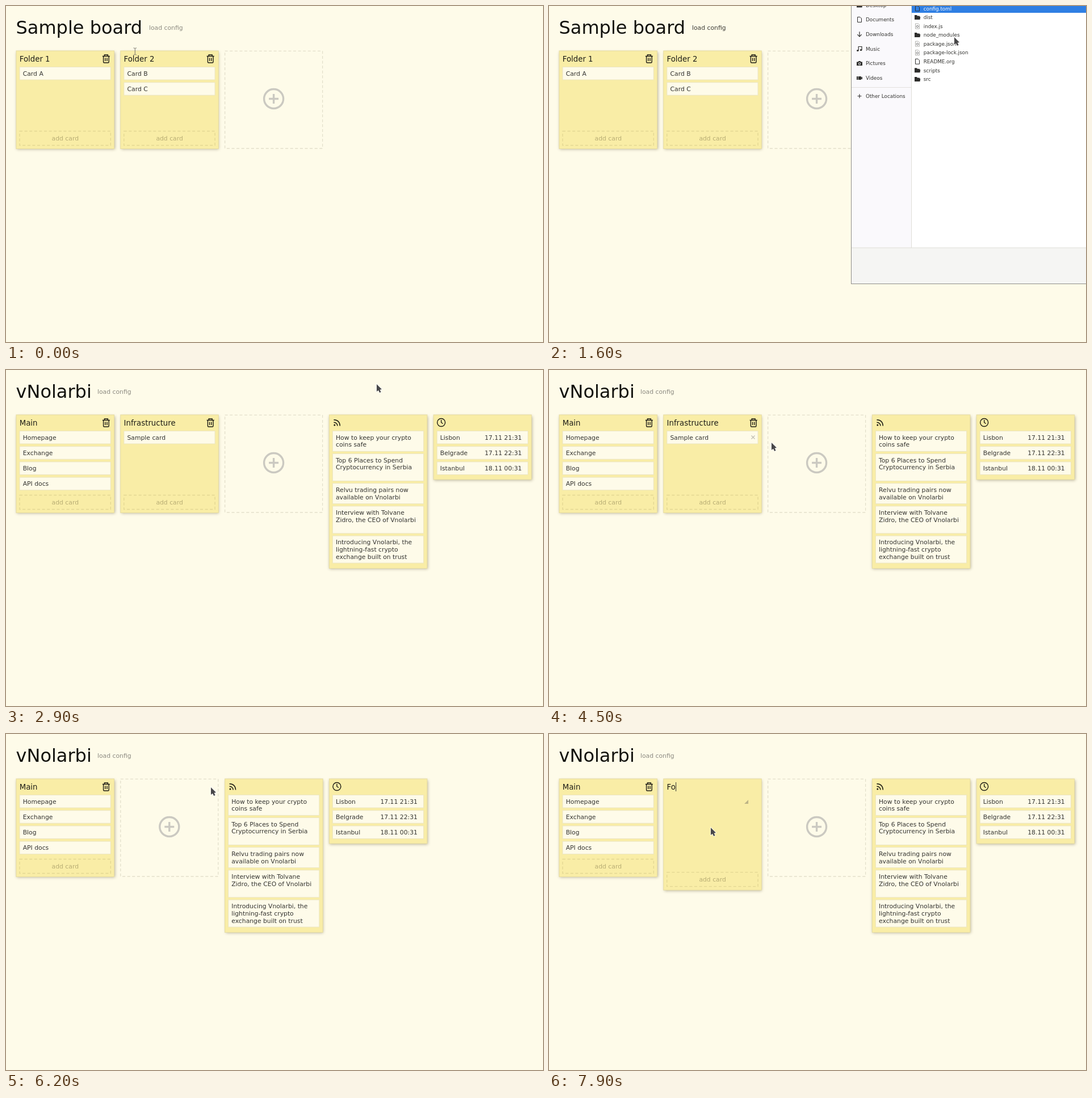
An HTML page with a canvas that plays this animation: 946x592 px, repeating every 8000 ms.

```html
<!DOCTYPE html>
<html lang="en">
<head>
<meta charset="utf-8">
<title>Board</title>
<style>
html, body { margin: 0; width: 100%; height: 100%; overflow: hidden; background: #fefbe9; }
canvas { display: block; }
</style>
</head>
<body>
<canvas id="stage" width="946" height="592"></canvas>
<script>
const ctx = document.getElementById('stage').getContext('2d');
const LOOP = 8000, STEP = 100, PAPER = '#fefbe9', YELLOW = '#f9eda6', INK = '#333330';
const DIALOG_OPEN = 1100, LOADED = 2800, CARD_GONE = 5200, FOLDER_GONE = 6200, FOLDER_NEW = 7000;

// time, x, y of the pointer tip
const PATH = [
  [0, 227, 80], [300, 200, 205], [400, 200, 205], [800, 282, 38], [1000, 282, 38],
  [1600, 714, 55], [1800, 690, 12], [2600, 653, 6], [2700, 653, 6], [2900, 653, 25],
  [3600, 720, 150], [3700, 720, 150], [4200, 520, 215], [4400, 345, 122], [4500, 392, 128],
  [5000, 361, 117], [5400, 361, 117], [6000, 361, 94], [6200, 361, 94], [6800, 285, 165], [8000, 285, 165]
];
const FEED = [
  [36, 'How to keep your crypto', 'coins safe'],
  [48, 'Top 6 Places to Spend', 'Cryptocurrency in Serbia'],
  [36, 'Relvu trading pairs now', 'available on Vnolarbi'],
  [48, 'Interview with Tolvane', 'Zidro, the CEO of Vnolarbi'],
  [48, 'Introducing Vnolarbi, the', 'lightning-fast crypto', 'exchange built on trust']
];
const ZONES = [['Lisbon', '17.11 21:31'], ['Belgrade', '17.11 22:31'], ['Istanbul', '18.11 00:31']];
const FILES = [
  ['config.toml', 'doc'], ['dist', 'folder'], ['index.js', 'script'], ['node_modules', 'folder'],
  ['package.json', 'script'], ['package-lock.json', 'script'], ['README.org', 'doc'],
  ['scripts', 'folder'], ['src', 'folder']
];
const PLACES = [
  ['Desktop', 'folder', -1.5], ['Documents', 'doc', 24], ['Downloads', 'down', 49.7], ['Music', 'note', 75.5],
  ['Pictures', 'camera', 101], ['Videos', 'video', 127], ['Other Locations', 'plus', 158.7]
];

function pointerAt(t) {
  const i = Math.max(1, PATH.findIndex(p => p[0] >= t));
  const [a, b] = [PATH[i - 1], PATH[i]];
  const k = Math.max(0, (t - a[0]) / (b[0] - a[0]));
  return { x: a[1] + (b[1] - a[1]) * k, y: a[2] + (b[2] - a[2]) * k };
}

const inside = (p, x, y, w, h) => p.x >= x && p.x <= x + w && p.y >= y && p.y <= y + h;

function text(str, x, y, size = 10.8, color = INK, align = 'left') {
  ctx.font = `${size}px "DejaVu Sans", sans-serif`;
  ctx.fillStyle = color;
  ctx.textAlign = align;
  ctx.fillText(str, x, y);
}

function rect(x, y, w, h, fill) {
  ctx.fillStyle = fill;
  ctx.fillRect(x, y, w, h);
}

function stroke(d, color, width, x = 0, y = 0) {
  ctx.save();
  ctx.translate(x, y);
  ctx.strokeStyle = color;
  ctx.lineWidth = width;
  ctx.stroke(new Path2D(d));
  ctx.restore();
}

function fill(d, color, x = 0, y = 0) {
  ctx.save();
  ctx.translate(x, y);
  ctx.fillStyle = color;
  ctx.fill(new Path2D(d));
  ctx.restore();
}

function dashed(x, y, w, h, color) {
  ctx.setLineDash([5, 3.6]);
  ctx.strokeStyle = color;
  ctx.lineWidth = 1.3;
  ctx.strokeRect(x, y, w, h);
  ctx.setLineDash([]);
}

function panel(x, h) {
  ctx.save();
  ctx.shadowColor = 'rgba(60,50,10,.35)';
  ctx.shadowBlur = 5;
  ctx.shadowOffsetX = 1;
  ctx.shadowOffsetY = 1.5;
  rect(x, 79, 172.5, h, YELLOW);
  ctx.restore();
  ctx.strokeStyle = '#e6dca2';
  ctx.lineWidth = 1;
  ctx.strokeRect(x, 79, 172.5, h);
}

function card(x, y, h) {
  rect(x + 6, y, 160.3, h, PAPER);
  ctx.strokeStyle = '#ece5c0';
  ctx.lineWidth = 1;
  ctx.strokeRect(x + 6, y, 160.3, h);
}

function trash(x) {
  stroke('M-6.5-4.5H6.5M-3-4.5V-7H3V-4.5M-4.8-4.5V5.5Q-4.8 7-3.3 7H3.3Q4.8 7 4.8 5.5V-4.5M-1.6-1.5V4M1.6-1.5V4',
    '#1c1b14', 1.4, x + 158.4, 93);
}

function folder({ name, cards = [], addY = 220.5, height = 172.5, editing }, x, mouse) {
  panel(x, height);
  text(name, x + 5.7, 97.5, 13.333, '#1f1e18');
  if (editing) {
    rect(x + 6 + ctx.measureText(name).width, 85, 1, 16, '#333');
    fill('M0 0V7H-7Z', '#bdb486', x + 149.3, 116);
  } else trash(x);
  cards.forEach((label, i) => {
    const y = 107.5 + 27.2 * i;
    card(x, y, 22.5);
    text(label, x + 11.7, y + 15);
    if (inside(mouse, x + 6, y, 160, 22.5)) stroke('M-3-3L3 3M3-3L-3 3', '#bdbbb0', 1.1, x + 157.7, y + 11);
  });
  dashed(x + 6, addY, 160.3, 25, '#e2d692');
  text('add card', x + 86.3, addY + 16.3, 10.8, '#b8ad74', 'center');
}

function adder(x, mouse) {
  dashed(x, 79.3, 172, 171.7, '#e3dfcb');
  const near = Math.hypot(mouse.x - x - 86, mouse.y - 163.5) < 19;
  stroke('M-17 0A17 17 0 1 1 17 0A17 17 0 1 1-17 0M-8.5 0H8.5M0-8.5V8.5', near ? '#767469' : '#cbc9c1', 3.4, x + 86, 163.5);
}

function feed(x) {
  panel(x, 270.5);
  fill('M-5.6 4a1.5 1.5 0 1 0 3 0a1.5 1.5 0 1 0-3 0', '#1c1b14', x + 13.5, 93);
  stroke('M-5.5-.8Q.6-.5 1 5.5M-5.5-5.3Q5-5 5.5 5.5', '#1c1b14', 1.4, x + 13.5, 93);
  let y = 107.3;
  for (const [h, ...lines] of FEED) {
    card(x, y, h);
    lines.forEach((line, i) => text(line, x + 11.6, y + 15.2 + 12.6 * i));
    y += h + 4.2;
  }
}

function clock(x) {
  panel(x, 114);
  stroke('M-7 0A7 7 0 1 1 7 0A7 7 0 1 1-7 0M0-4.5V0L3 2', '#1c1b14', 1.4, x + 13.5, 92.5);
  ZONES.forEach(([city, time], i) => {
    const y = 107.5 + 27.2 * i;
    card(x, y, 22.5);
    text(city, x + 11.6, y + 15);
    text(time, x + 155.5, y + 15, 10.8, INK, 'right');
  });
}

function icon(kind, x, y) {
  const c = '#2e2e2c';
  if (kind === 'doc') stroke('M-3.5-4.5H1L3.5-2V4.5H-3.5Z', c, 1, x, y);
  if (kind === 'folder') fill('M-5-4H-1L0-2.5H4V-1H5.3L4.5 4H-5Z', c, x, y);
  if (kind === 'script') {
    stroke('M-3.5-4.5H1.5L3.5-2.5V4.5H-3.5Z', '#a8a8a4', .9, x, y);
    stroke('M-1.8.5a1.8 1.8 0 1 0 3.6 0a1.8 1.8 0 1 0-3.6 0', '#777', 1, x, y);
  }
  if (kind === 'down') stroke('M0-4.5V4M-3.7.5L0 4.2L3.7.5', c, 1.2, x, y);
  if (kind === 'note') {
    stroke('M-1.8 3V-4H4V2', c, 1.2, x, y);
    fill('M-5 3a1.8 1.6 0 1 0 3.6 0a1.8 1.6 0 1 0-3.6 0M.8 2a1.8 1.6 0 1 0 3.6 0a1.8 1.6 0 1 0-3.6 0', c, x, y);
  }
  if (kind === 'camera') {
    fill('M-5-2.5H-2.5L-1.5-4H1.5L2.5-2.5H5V4H-5Z', c, x, y);
    stroke('M-1.8.7a1.8 1.8 0 1 0 3.6 0a1.8 1.8 0 1 0-3.6 0', '#faf9fc', 1, x, y);
  }
  if (kind === 'video') fill('M-5-3H-3V3H-5ZM-2.3-3H3V-.8L5-2.5V2.5L3 .8V3H-2.3Z', c, x, y);
  if (kind === 'plus') stroke('M-3.5 0H3.5M0-3.5V3.5', c, 1.1, x, y);
}

function dialog() {
  rect(532, 0, 414, 490, '#8f8e89');
  rect(533, 0, 413, 489, '#fff');
  rect(533, 0, 105, 426, '#faf9fc');
  rect(638, 0, 1, 426, '#dfddd8');
  rect(533, 143, 105, 1, '#e3e1de');
  rect(533, 426, 413, 63, '#f5f5f3');
  rect(533, 425.5, 413, 1, '#dfddd8');
  rect(639, 0, 307, 12, '#2f7fe3');
  PLACES.forEach(([label, kind, y]) => {
    icon(kind, 547, y);
    text(label, 558, y + 3.2, 8.8);
  });
  FILES.forEach(([label, kind], i) => {
    const y = 4.4 + 15.56 * i;
    icon(kind, 649, y);
    text(label, 659.7, y + 3.2, 8.8, i ? INK : '#fff');
  });
}

function cursor(kind, { x, y }) {
  if (kind === 'beam') return stroke('M-2.5-6H-.7L.3-5L1.3-6H3M.3-5V5M-2.5 6H-.7L.3 5L1.3 6H3', '#77756c', 1, x, y);
  const shape = kind === 'hand'
    ? 'M0 1Q1.5-.8 3 1V6L8 7Q9.5 7.5 9.3 9.5L8 15H1.8L-3 9.5Q-2.5 7.8-.8 8.5L0 9Z'
    : 'M0 0V13L3 10.8L5.2 15L7.6 13.8L5.5 9.8L9 9Z';
  stroke(shape, 'rgba(255,255,255,.8)', 1.6, x, y);
  fill(shape, '#484749', x, y);
}

function draw(t) {
  const pos = pointerAt(t), mouse = pointerAt(Math.max(0, t - STEP));
  const loaded = t >= LOADED, open = t >= DIALOG_OPEN && !loaded;
  const idle = { x: -99, y: -99 };
  rect(0, 0, 946, 592, PAPER);

  const linkX = loaded ? 161 : 252;
  const onLink = inside(pos, linkX, 30, 60, 16);
  text(loaded ? 'vNolarbi' : 'Sample board', 17.5, 49.3, 32, '#11110d');
  text('load config', linkX, 42, 10.8, open || onLink ? '#3c3b36' : '#8c8a81');

  const columns = [];
  const add = (drawer, data) => columns.push([drawer, data]);
  if (loaded) {
    add(folder, { name: 'Main', cards: ['Homepage', 'Exchange', 'Blog', 'API docs'] });
    if (t < FOLDER_GONE) {
      const gone = t >= CARD_GONE;
      add(folder, { name: 'Infrastructure', cards: gone ? [] : ['Sample card'], addY: gone ? 218 : 220.5 });
    } else if (t >= FOLDER_NEW) {
      const typed = (t >= 7600) + (t >= 7900);
      add(folder, { name: 'Fo'.slice(0, typed), addY: 243.7, height: 196, editing: true });
    }
  } else {
    add(folder, { name: 'Folder 1', cards: ['Card A'] });
    add(folder, { name: 'Folder 2', cards: ['Card B', 'Card C'] });
  }
  add(adder);
  if (loaded) [feed, clock].forEach(d => add(d));

  columns.forEach(([drawer, data], i) => {
    const x = 18 + 183.8 * i, at = open ? idle : mouse;
    data ? drawer(data, x, at) : drawer(x, at);
  });

  if (open) dialog();
  const onTrash = t < FOLDER_GONE && inside(pos, 352, 84, 16, 18);
  const onPlus = t >= FOLDER_GONE && t < FOLDER_NEW && inside(pos, 269, 145, 38, 38);
  const hand = !open && (onLink || onTrash || onPlus);
  cursor(t < STEP ? 'beam' : hand ? 'hand' : 'arrow', pos);
}

function tick(now) {
  draw(Math.floor(now % LOOP / STEP) * STEP);
  requestAnimationFrame(tick);
}
tick(performance.now());
</script>
</body>
</html>
```
